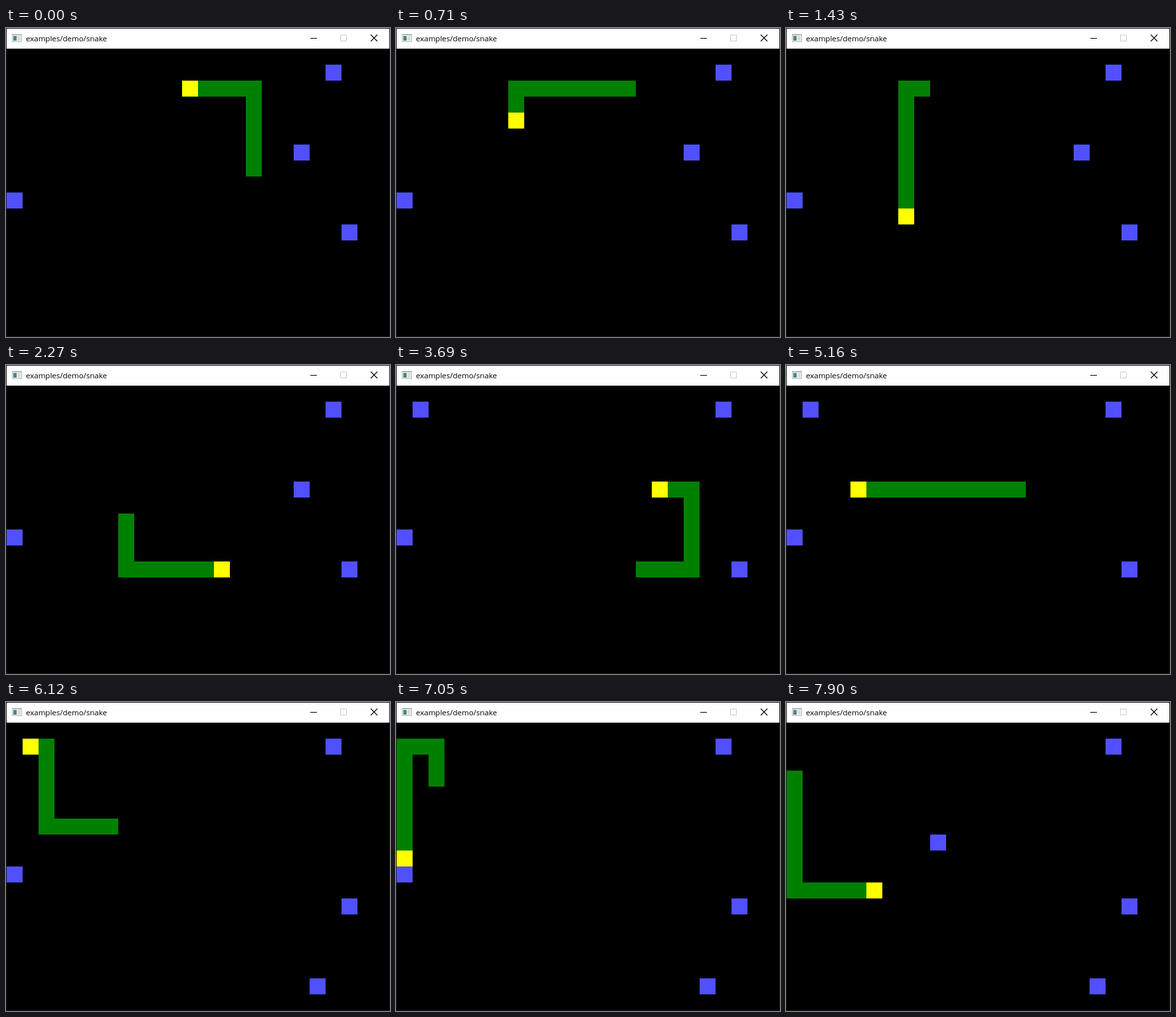
An HTML page with a canvas for the animation above (8000 ms loop, 578 by 464 pixels).

```html
<!DOCTYPE html>
<html lang="en">
<head>
<meta charset="utf-8">
<title>Snake</title>
<style>
  html, body { margin: 0; width: 578px; height: 464px; overflow: hidden; background: #000; }
  svg, canvas { position: absolute; display: block; }
  svg { left: 0; top: 0; }
  canvas { left: 1px; top: 31px; }
  text { font: 11.5px "Open Sans", "Noto Sans", sans-serif; }
</style>
</head>
<body>
<svg width="578" height="464" viewBox="0 0 578 464">
  <rect width="578" height="464" fill="#1c1c1c"/>
  <rect x="1" y="1" width="576" height="30" fill="#fff"/>
  <!-- window icon -->
  <g shape-rendering="crispEdges">
    <rect x="9" y="9" width="15" height="12" fill="#b4babc"/>
    <rect x="10" y="11" width="13" height="9" fill="#f2f4f4"/>
    <rect x="11" y="12" width="5" height="7" fill="#4f8586"/>
    <rect x="17" y="12" width="5" height="7" fill="#d9dedf"/>
  </g>
  <text x="30" y="20">examples/demo/snake</text>
  <!-- window buttons -->
  <g fill="none" stroke="#000">
    <path d="M458 15.5h10"/>
    <path d="M503.5 10.5h9v9h-9z" stroke="#ccc"/>
    <path d="M549 10l10 10M559 10l-10 10" stroke-width="1.1"/>
  </g>
</svg>
<canvas width="576" height="432"></canvas>
<script>
const LOOP = 8000, MOVE = 120, LEAD = 30, CELL = 24, START_LENGTH = 10;
const canvas = document.querySelector('canvas');
const ctx = canvas.getContext('2d');

// Signed leg lengths in cells, vertical and horizontal in turn.
const legs = [-5, -8, 9, 11, -5, -16, -5, -2, 9, 5];
const firstFoods = [[20, 1], [18, 6], [0, 9], [21, 11]];
const spawns = [[1, 1], [19, 16], [9, 7]];

const route = [[15, 7]];
legs.forEach((leg, i) => {
  for (let n = Math.abs(leg); n > 0; n--) {
    const next = [...route.at(-1)];
    next[(i + 1) % 2] += Math.sign(leg);
    route.push(next);
  }
});

const same = (a, b) => a[0] === b[0] && a[1] === b[1];

// Replays the game up to a move; the snake grows one move after each meal.
function play(moves) {
  const foods = [...firstFoods];
  let head = START_LENGTH - 1, tail = 0, meals = 0, full = false;
  for (let m = 0; m < moves; m++) {
    head++;
    if (!full) tail++;
    const hit = foods.findIndex(food => same(food, route[head]));
    full = hit >= 0;
    if (full) foods[hit] = spawns[meals++];
  }
  return { foods, body: route.slice(tail, head), head: route[head] };
}

function fillCell([col, row], color) {
  ctx.fillStyle = color;
  ctx.fillRect(col * CELL, row * CELL, CELL, CELL);
}

function draw(time) {
  const { foods, body, head } = play(Math.floor((time + LEAD) / MOVE));
  ctx.fillStyle = '#000';
  ctx.fillRect(0, 0, canvas.width, canvas.height);
  foods.forEach(cell => fillCell(cell, '#5050ff'));
  body.forEach(cell => fillCell(cell, '#008000'));
  fillCell(head, '#ffff00');
}

function tick() {
  draw(performance.now() % LOOP);
  requestAnimationFrame(tick);
}
tick();
</script>
</body>
</html>
```
